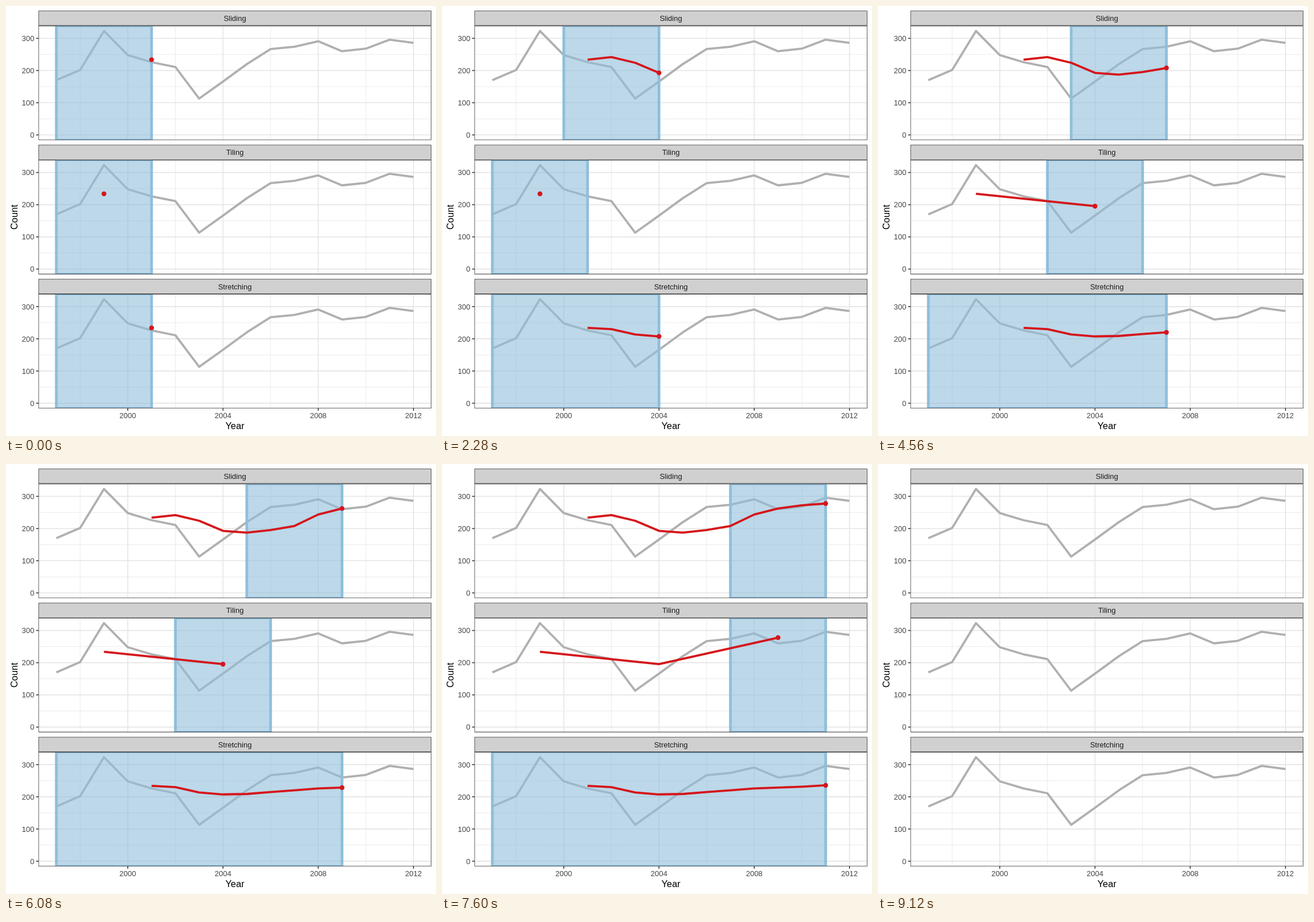
These frames come from a looping animation (748x748 px, 9880 ms). An HTML page with a canvas:

```html
<!DOCTYPE html>
<html lang="en">
<head>
<meta charset="utf-8">
<title>Rolling windows</title>
<style>
  html, body { margin: 0; width: 100%; height: 100%; overflow: hidden; background: #fff; }
  canvas { display: block; }
</style>
</head>
<body>
<canvas id="chart" width="748" height="748"></canvas>
<script>
const ctx = document.getElementById('chart').getContext('2d');

const STEP_MS = 760, STEPS = 13, SIZE = 5;
const FIRST = 1997, LAST = 2012;
const counts = [170, 202, 323, 248, 226, 211, 113, 166, 220, 267, 274, 291, 260, 268, 296, 286];

const LEFT = 56.5, RIGHT = 739.86, STRIP_TOP = 8.14, PANEL_TOP = 34.4, PANEL_BOTTOM = 233.35;
const PITCH = 233.3, MID = (LEFT + RIGHT) / 2;
const YEAR_W = (RIGHT - LEFT) / 16.5;
const THIN = 0.78, THICK = 1.57;
const FONT = '"Liberation Sans", Arial, sans-serif';
const GREY = '#b0b0b0', RED = '#d5161b', BLUE = '#8fbedb', DARK = '#333';

const xOf = year => LEFT + (year - FIRST + 0.75) * YEAR_W;
const yOf = count => 224.3 - count * 0.56;

function mean(from, to) {
  const part = counts.slice(from - FIRST, to - FIRST + 1);
  return part.reduce((a, b) => a + b, 0) / part.length;
}

// Each mode lists its windows up to the given year, and where the mean is plotted.
const trailing = (end, startOf) => {
  const list = [];
  for (let to = FIRST + SIZE - 1; to <= end; to++) list.push({ from: startOf(to), to, at: to });
  return list;
};
const modes = [
  { name: 'Sliding', windows: end => trailing(end, to => to - SIZE + 1) },
  { name: 'Tiling', windows: end => trailing(end, to => to - SIZE + 1)
      .filter(w => (w.from - FIRST) % SIZE === 0)
      .map(w => ({ ...w, at: w.from + 2 })) },
  { name: 'Stretching', windows: end => trailing(end, () => FIRST) }
];

function polyline(points, color, width) {
  ctx.beginPath();
  points.forEach(([x, y]) => ctx.lineTo(x, y));
  ctx.strokeStyle = color;
  ctx.lineWidth = width;
  ctx.stroke();
}

function text(str, x, y, size, color, align = 'center') {
  ctx.font = `${size}px ${FONT}`;
  ctx.textAlign = align;
  ctx.fillStyle = color;
  ctx.fillText(str, x, y);
}

function clipped(top, bottom, draw) {
  ctx.save();
  ctx.beginPath();
  ctx.rect(LEFT, top, RIGHT - LEFT, bottom - top);
  ctx.clip();
  draw();
  ctx.strokeStyle = DARK;
  ctx.lineWidth = THICK;
  ctx.strokeRect(LEFT, top, RIGHT - LEFT, bottom - top);
  ctx.restore();
}

function drawGrid() {
  const across = (c, w) => polyline([[LEFT, yOf(c)], [RIGHT, yOf(c)]], '#e5e5e5', w);
  const down = (yr, w) => polyline([[xOf(yr), PANEL_TOP], [xOf(yr), PANEL_BOTTOM]], '#e5e5e5', w);
  for (let c = 50; c < 300; c += 100) across(c, THIN);
  for (let yr = 1998; yr < LAST; yr += 4) down(yr, THIN);
  for (let c = 0; c <= 300; c += 100) across(c, THICK);
  for (let yr = 2000; yr <= LAST; yr += 4) down(yr, THICK);
}

function drawWindows(windows) {
  const { from, to } = windows[windows.length - 1];
  const box = [xOf(from), PANEL_TOP, xOf(to) - xOf(from), PANEL_BOTTOM - PANEL_TOP];
  ctx.fillStyle = BLUE;
  ctx.globalAlpha = 0.6;
  ctx.fillRect(...box);
  ctx.globalAlpha = 1;
  ctx.strokeStyle = BLUE;
  ctx.lineWidth = 4.7;
  ctx.strokeRect(...box);

  const points = windows.map(w => [xOf(w.at), yOf(mean(w.from, w.to))]);
  if (points.length > 1) polyline(points, RED, 3.8);
  ctx.beginPath();
  ctx.arc(...points[points.length - 1], 4.2, 0, Math.PI * 2);
  ctx.fillStyle = RED;
  ctx.fill();
}

function drawPanel(mode, end) {
  clipped(STRIP_TOP, PANEL_TOP, () => {
    ctx.fillStyle = '#d0d0d0';
    ctx.fillRect(LEFT, STRIP_TOP, RIGHT - LEFT, PANEL_TOP - STRIP_TOP);
  });
  text(mode.name, MID, 26, 13, '#1a1a1a');

  clipped(PANEL_TOP, PANEL_BOTTOM, () => {
    drawGrid();
    polyline(counts.map((c, i) => [xOf(FIRST + i), yOf(c)]), GREY, 3.8);
    if (end <= LAST) drawWindows(mode.windows(end));
  });

  for (let c = 0; c <= 300; c += 100) {
    polyline([[LEFT - 4.07, yOf(c)], [LEFT, yOf(c)]], DARK, THICK);
    text(c, 49.2, yOf(c) + 4.7, 13, '#444', 'right');
  }
}

function draw(step) {
  ctx.fillStyle = '#fff';
  ctx.fillRect(0, 0, 748, 748);
  ctx.lineJoin = 'round';
  modes.forEach((mode, i) => {
    ctx.save();
    ctx.translate(0, i * PITCH);
    drawPanel(mode, FIRST + SIZE - 1 + step);
    ctx.restore();
  });

  const base = PANEL_BOTTOM + 2 * PITCH;
  for (let yr = 2000; yr <= LAST; yr += 4) {
    polyline([[xOf(yr), base], [xOf(yr), base + 4.07]], DARK, THICK);
    text(yr, xOf(yr), 716.8, 13, '#444');
  }
  text('Year', MID, 736.3, 16.3, '#000');
  ctx.save();
  ctx.translate(19.8, (PANEL_TOP + PANEL_BOTTOM) / 2 + PITCH);
  ctx.rotate(-Math.PI / 2);
  text('Count', 0, 0, 16.3, '#000');
  ctx.restore();
}

const start = performance.now();
function tick() {
  draw(Math.floor((performance.now() - start) / STEP_MS) % STEPS);
  requestAnimationFrame(tick);
}
tick();
</script>
</body>
</html>
```
